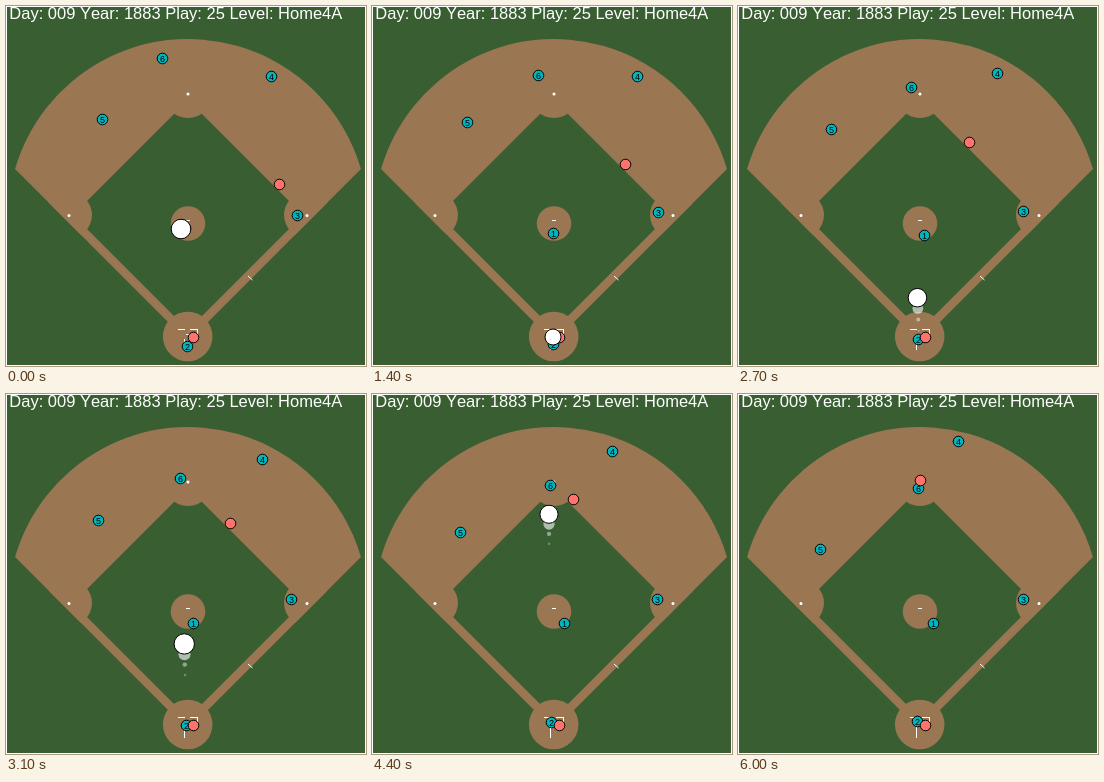
Write an HTML page with a canvas that moves like this. It is 360 px wide and 360 px high and loops after 6100 ms.

```html
<!DOCTYPE html>
<html>
<head>
<meta charset="utf-8">
<style>
html, body { margin: 0; height: 100%; overflow: hidden; background: #385e32; }
canvas { display: block; }
</style>
</head>
<body>
<canvas id="stage" width="360" height="360"></canvas>
<script>
const ctx = document.getElementById('stage').getContext('2d');
const LOOP = 6100, STEP = 100;
const GRASS = '#385e32', DIRT = '#9b7653', TEAL = '#00b6be', RED = '#ff736c';
const CAUGHT = 930, THROWN = 2350, RECEIVED = 4680, SAFE = 5400;

const linear = p => p;
const easeOut = p => 1 - (1 - p) ** 2;
const smooth = p => p * p * (3 - 2 * p);
const power = k => p => p ** k;
// Constant acceleration for the first share k of the time, then steady speed.
const speedUp = k => p => (p < k ? p * p / (2 * k) : p - k / 2) / (1 - k / 2);

function progress(t, start, end, ease = linear) {
  return ease(Math.min(1, Math.max(0, (t - start) / (end - start))));
}
const mix = (a, b, p) => a + (b - a) * p;
const between = ([x1, y1], [x2, y2], p) => [mix(x1, x2, p), mix(y1, y2, p)];

const fielders = {
  1: t => [mix(179, 195, progress(t, 0, 6000, smooth)), mix(222, 229, progress(t, 0, 3100, easeOut))],
  2: t => between([181, 340], [179, 327], progress(t, 0, 5000, smooth)),
  3: t => between([291, 209], [285, 205], progress(t, 0, 2200, easeOut)),
  4: t => between([265, 70], [220, 47], progress(t, 1400, 6000, speedUp(0.41))),
  5: t => between([96, 113], [82, 155], progress(t, 0, 6000, speedUp(0.67))),
  6: t => between([156, 52], [180, 94], progress(t, 0, 6000, easeOut))
};
const runner = t => between([273, 178], [182, 86], progress(t, 0, SAFE, power(1.12)));
const batter = [187, 331];

// Ball position and apparent size: a pitch, a pause at the plate, then an arcing throw.
function ballAt(t) {
  if (t < CAUGHT) {
    const p = progress(t, 0, CAUGHT);
    return [...between([175, 223], [181, 331], p), mix(9.8, 6.3, p)];
  }
  const p = progress(t, THROWN, RECEIVED);
  return [mix(177, 181, (1 - p) ** 3), mix(331, 93, p ** 0.95), 8 + 10 * p * (1 - p)];
}

function disc(x, y, r, fill, outlined) {
  ctx.beginPath();
  ctx.arc(x, y, r, 0, 2 * Math.PI);
  ctx.fillStyle = fill;
  ctx.fill();
  if (outlined) ctx.stroke();
}

function drawDirt() {
  ctx.save();
  ctx.beginPath();
  ctx.arc(182, 213, 180, Math.PI + 0.281, -0.281);
  ctx.lineTo(182, 336);
  ctx.fillStyle = DIRT;
  ctx.fill();
  ctx.clip();
  ctx.beginPath();
  for (const [dx, dy] of [[0, -1], [1, 0], [0, 1], [-1, 0]]) ctx.lineTo(182 + 115 * dx, 209 + 115 * dy);
  ctx.fillStyle = GRASS;
  ctx.fill();
  disc(182, 88, 24, DIRT);
  disc(63, 209, 23, DIRT);
  disc(301, 209, 23, DIRT);
  ctx.restore();
  disc(182, 217.5, 17.3, DIRT);
  disc(181.7, 330.5, 24.8, DIRT);
}

function drawLines() {
  disc(182, 88, 1.5, '#fff');
  disc(63, 209.5, 1.5, '#fff');
  disc(301, 209.5, 1.5, '#fff');
  ctx.fillRect(180, 214, 4, 1);
  ctx.fillRect(172, 323, 7, 1);
  ctx.fillRect(184, 323, 8, 1);
  ctx.fillRect(191, 323, 1, 8);
  ctx.fillRect(178, 333, 1, 11);
  ctx.fillRect(180, 328, 4, 1);
  ctx.strokeStyle = '#fff';
  ctx.beginPath();
  ctx.moveTo(242, 270);
  ctx.lineTo(246.5, 274);
  ctx.stroke();
  ctx.strokeRect(0.5, 0.5, 359, 359);
}

function drawField() {
  ctx.fillStyle = GRASS;
  ctx.fillRect(0, 0, 360, 360);
  drawDirt();
  drawLines();
  ctx.font = '16.5px "Liberation Sans", Arial, sans-serif';
  ctx.textAlign = 'left';
  ctx.fontKerning = 'none';
  ctx.fillText('Day: 009 Year: 1883 Play: 25 Level: Home4A', 3.3, 13);
}

function drawPlayer([x, y], color, label = '') {
  x = Math.round(x) + 0.5;
  y = Math.round(y) + 0.5;
  disc(x, y, 5.3, color, true);
  ctx.fillStyle = '#000';
  ctx.fillText(label, x, y + 3.2);
}

function drawBall(t) {
  if (t >= SAFE) return;
  for (let lag = 3; lag > 0; lag--) {
    const [x, y, r] = ballAt(t - lag * STEP);
    disc(x, y, r * 0.6 / lag ** 1.4, `rgba(255,255,255,${0.75 - 0.15 * lag})`);
  }
  disc(...ballAt(t), '#fff', true);
}

function frame(now) {
  const t = Math.floor((now % LOOP) / STEP) * STEP;
  drawField();
  ctx.strokeStyle = '#000';
  ctx.font = '9px "Liberation Sans", Arial, sans-serif';
  ctx.textAlign = 'center';
  for (const number in fielders) drawPlayer(fielders[number](t), TEAL, number);
  drawPlayer(batter, RED);
  drawPlayer(runner(t), RED);
  drawBall(t);
  requestAnimationFrame(frame);
}
requestAnimationFrame(frame);
</script>
</body>
</html>
```
